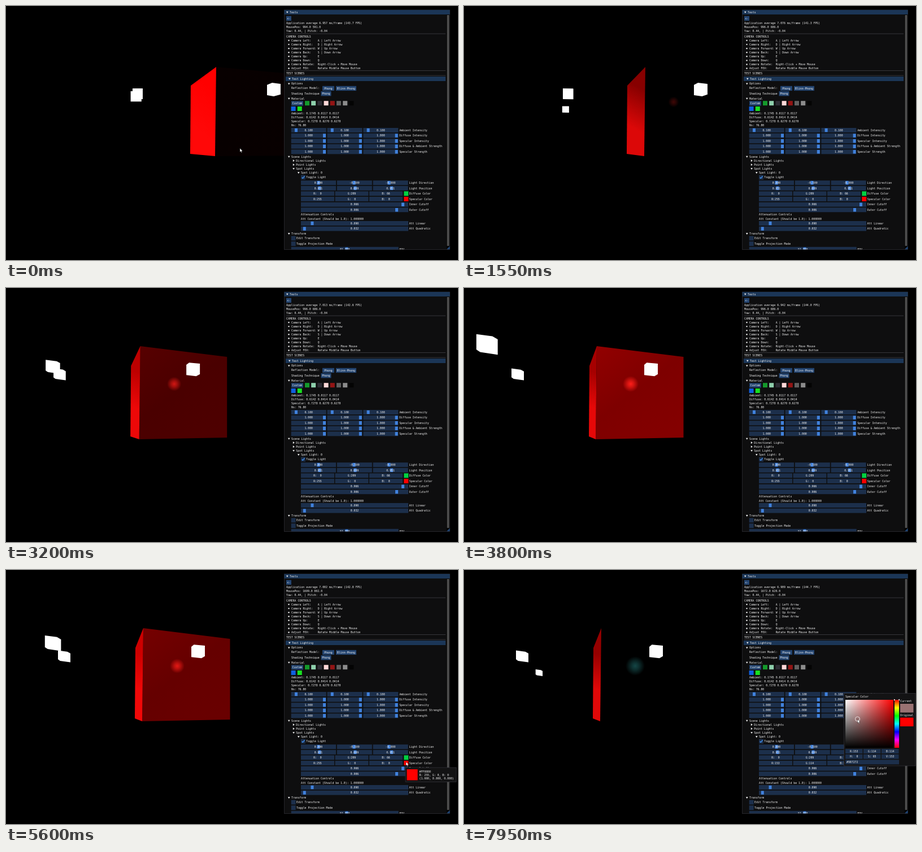
Recreate the animation shown at these times as an HTML page with a canvas. Size 800 by 450 pixels, loop 8000 ms.

```html
<!DOCTYPE html>
<html>
<head>
<meta charset="utf-8">
<style>
html, body { margin: 0; width: 100%; height: 100%; overflow: hidden; background: #000; }
canvas { display: block; width: 800px; height: 450px; }
</style>
</head>
<body>
<canvas id="stage" width="800" height="450"></canvas>
<script>
const ctx = document.getElementById('stage').getContext('2d');
const LOOP = 8;
const FRAME = '#1c2f4b', BUTTON = '#234470', HEADER = '#1b3657', GRAB = '#4182dd', BORDER = '#3a3a42';

// time, post lamp x, near lamp x, side left, side right, swing phase, side red, highlight, ms per frame
const SCENE = [
  [0,    224, 462, 326, 372, -1.61, 255, 0,    6.957],
  [0.85, 212, 450, 317, 361, -0.67, 240, 0.1,  7.03],
  [1.55, 175, 407, 288, 321, 0.1,   220, 0.25, 7.076],
  [2.55, 128, 368, 256, 280, 1.343, 245, 0.55, 7.071],
  [3.35, 74,  308, 212, 228, 2.12,  235, 0.8,  7],
  [3.8,  84,  319, 221, 235, 2.527, 230, 1,    6.942],
  [4.1,  92,  328, 228, 242, 2.79,  230, 1,    6.98],
  [4.8,  92,  328, 228, 243, 3.418, 230, 1,    7.066],
  [6.35, 92,  328, 228, 243, 4.836, 252, 0.65, 6.942],
  [7.95, 92,  328, 228, 243, 6.4,   225, 0.5,  6.909]
];
const MOUSE = [
  [0, 414, 252], [0.6, 415, 292], [4.65, 415, 292], [4.8, 475, 272], [5.6, 708, 340],
  [6.35, 710, 341], [6.85, 710, 341], [7.2, 745, 240], [7.6, 720, 255], [7.95, 696.5, 264.5]
];
const HIDE_MOUSE = 0.6, SHOW_MOUSE = 4.65, HOVER = 5.6, PICK = 6.85, DRAG = 7.2;

const clamp = (v, lo = 0, hi = 1) => Math.min(hi, Math.max(lo, v));
const mix = (a, b, k) => a + (b - a) * k;
const rgb = (...c) => `rgb(${c.map(Math.round).join(',')})`;

function sample(keys, t) {
  let i = 0;
  while (i < keys.length - 2 && t > keys[i + 1][0]) i++;
  const a = keys[i], b = keys[i + 1], k = clamp((t - a[0]) / (b[0] - a[0]));
  return a.slice(1).map((v, n) => mix(v, b[n + 1], k));
}

function rect(x, y, w, h, fill) {
  ctx.fillStyle = fill;
  ctx.fillRect(x, y, w, h);
}

function frame(x, y, w, h, fill) {
  rect(x, y, w, h, fill);
  ctx.strokeStyle = BORDER;
  ctx.lineWidth = 0.6;
  ctx.strokeRect(x, y, w, h);
}

function poly(points, fill) {
  ctx.fillStyle = fill;
  ctx.beginPath();
  for (const [x, y] of points) ctx.lineTo(x, y);
  ctx.closePath();
  ctx.fill();
}

// y is the middle of the capitals; the interface grid is 1920 units wide
function text(s, x, y, align = 'left') {
  ctx.save();
  ctx.translate(x, y + 1.7);
  ctx.scale(1 / 2.4, 1 / 2.4);
  ctx.font = '11.63px "DejaVu Sans Mono", monospace';
  ctx.textAlign = align;
  ctx.fillStyle = '#f4f4f4';
  ctx.fillText(s, 0, 0);
  ctx.restore();
}

function solid(points, x, y, w, h) {
  poly(points.map(([u, v]) => [x + u * w, y + v * h]), '#fff');
}

function drawScene(t, s, sat) {
  const [postX, nearX, left, right, phase, red, shine] = s;
  const forward = clamp(t - 1.55), zoom = 1 + 0.045 * forward;
  const swing = Math.cos(phase);
  const topL = 141 - 3 * forward, topR = 108 - 5 * forward;
  const botR = 266 + 2 * forward, botL = 262 + forward;

  // front face and its highlight
  const spotX = right + 60 - 10 * (1 - forward), spotY = 170;
  const face = [[right, topR], [right + 153.5, 122], [right + 153.5, 265], [right - 2, botR]];
  const lit = clamp(-swing * 1.5);
  if (lit > 0) {
    const g = ctx.createLinearGradient(right, 110, right + 120, 268);
    g.addColorStop(0, rgb(145 * lit, 0, 0));
    g.addColorStop(0.5, rgb(126 * lit, 0, 0));
    g.addColorStop(1, rgb(132 * lit, 0, 0));
    poly(face, g);
  }
  const grey = clamp((1 - sat) / 0.75), radius = mix(8 + 6 * shine, 17, grey);
  const glow = ctx.createRadialGradient(spotX, spotY, 0, spotX, spotY, radius);
  const tone = [mix(255, 40, grey), mix(30, 140, grey), mix(25, 140, grey)].map(Math.round).join(',');
  glow.addColorStop(0, `rgba(${tone},${shine})`);
  glow.addColorStop(0.4, `rgba(${tone},${shine * 0.65})`);
  glow.addColorStop(1, `rgba(${tone},0)`);
  rect(spotX - radius, spotY - radius, 2 * radius, 2 * radius, glow);

  // side face
  const side = ctx.createLinearGradient(right, 150, left, 210);
  side.addColorStop(0, rgb(red * clamp(1 - (255 - red) / 90, 0.6), 0, 0));
  side.addColorStop(1, rgb(red, 8, 8));
  poly([[left + 1, topL], [right, topR], [right - 2, botR], [left, botL]], side);

  // lamps
  const turn = right - left, c = clamp((36 - turn) / 20) * 0.25;
  const facingLeft = [[0, 0], [1 - c, 0.4 * c], [1, c], [1, 1], [0.7 * c, 1 - c / 2], [0, 1 - c]];
  const w = 18 + 16 * c, h = 19 + 8 * c;
  solid(facingLeft, postX, 222 - 76 * zoom, w, h);

  const depth = 0.0158 + 0.0093 * swing + 0.0007 * (1 - forward);
  const worldX = (postX + w / 2 - 400) / (67 * zoom) - 0.33 - 2.13 * swing;
  const size = 0.31 / depth;
  solid(facingLeft, 400 + worldX / depth - size / 2, 222 - 1 / depth - size * 0.48, size, size * 0.96);

  const k = 0.1 + 0.006 * turn;
  solid([[0, 0.16], [k, 0], [1, 0.08], [1, 0.86], [1 - 1.35 * k, 1], [0, 0.92]],
    nearX, 222 - 86 * zoom, 24, 24);
}

function node(label, x, y, open = true) {
  poly(open ? [[x - 6, y - 1.3], [x - 2.4, y - 1.3], [x - 4.2, y + 1.8]]
            : [[x - 5.4, y - 1.9], [x - 2.4, y], [x - 5.4, y + 1.9]], '#f4f4f4');
  text(label, x, y);
}

function button(label, x, y, w) {
  rect(x, y - 4.2, w, 8.3, BUTTON);
  text(label, x + w / 2, y, 'center');
}

function field(value, x, y, w, grab) {
  rect(x, y - 4, w, 8, FRAME);
  if (grab) rect(grab - 2.5, y - 3.2, 5, 6.4, GRAB);
  text(value, x + w / 2, y, 'center');
}

function triple(label, x, y, values, grabs) {
  values.forEach((v, i) => field(v, x + i * 63.8, y, 62, grabs[i]));
  text(label, x + 191.5, y);
}

function wide(label, x, y, value, grab) {
  field(value, x, y, 190, grab);
  text(label, x + 191.5, y);
}

function checkbox(label, x, y, on) {
  rect(x, y - 4, 8, 8, FRAME);
  if (on) {
    ctx.strokeStyle = '#4296fa';
    ctx.lineWidth = 1.2;
    ctx.beginPath();
    ctx.moveTo(x + 1.8, y);
    ctx.lineTo(x + 3.3, y + 1.8);
    ctx.lineTo(x + 6.4, y - 2);
    ctx.stroke();
  }
  text(label, x + 9.3, y);
}

const channels = color => color.map((v, i) => 'RGB'[i] + ':' + String(v).padStart(3));

function colorRow(label, y, color) {
  channels(color).forEach((v, i) => field(v, 522 + i * 60.5, y, 59));
  rect(704.3, y - 4, 8, 8, rgb(...color));
  text(label, 713.8, y);
}

function drawPanel(t, ms, mouse, specular) {
  ctx.save();
  frame(492.5, 7, 293, 424.5, '#0e0e0f');
  ctx.beginPath();
  ctx.rect(492, 6.5, 294, 424.8);
  ctx.clip();
  rect(492.5, 7, 293, 8, HEADER);
  node('Tests', 502, 11);
  rect(779.5, 15, 6, 416, '#060606');
  rect(780.6, 16, 3.8, 409, '#4f4f4f');
  poly([[785.5, 425.5], [785.5, 431], [780, 431]], '#1f4474');

  button('<-', 496, 22, 9);
  text(`Application average ${ms.toFixed(3)} ms/frame (${(1000 / ms).toFixed(1)} FPS)`, 496, 30.5);
  text(`MousePos: ${Math.round(mouse[0] * 2.4)}.0 ${Math.round((mouse[1] - 6) * 2.4)}.0`, 496, 37.5);
  text('Yaw: 0.44, | Pitch: -0.04', 496, 44.5);
  for (const y of [48.8, 114.2, 122.8]) rect(496, y, 282, 0.6, '#505058');
  text('CAMERA CONTROLS', 496, 54);
  [['Left', 'A | Left Arrow'], ['Right', 'D | Right Arrow'], ['Forward', 'W | Up Arrow'],
   ['Back', 'S | Down Arrow'], ['Up', 'E'], ['Down', 'Q'], ['Rotate', 'Right-Click + Move Mouse'],
   ['', 'Rotate Middle Mouse Button']].forEach(([name, keys], i) => {
    const y = 61 + i * 7.08;
    ctx.fillStyle = '#f4f4f4';
    ctx.beginPath();
    ctx.arc(500.5, y, 1.2, 0, 7);
    ctx.fill();
    text(((name ? 'Camera ' + name : 'Adjust FOV') + ':').padEnd(16) + keys, 505, y);
  });
  text('TEST SCENES', 496, 119);

  rect(495, 125, 283, 8, HEADER);
  node('Test Lighting', 506, 129);
  node('Options', 505, 137.7);
  text('Reflection Model:', 505, 145);
  button('Phong', 560, 146, 21);
  button('Blinn-Phong', 584, 146, 36);
  text('Shading Technique', 505, 154.8);
  button('Phong', 557.5, 155.3, 18);
  node('Material', 505, 164);
  button('Custom', 505, 172.5, 21);
  ['#149a2c', '#8fd0ad', '#2c2c34', '#ffd8d8', '#921414', '#606060', '#8c8c8c', '#040404']
    .forEach((c, i) => rect(529 + i * 11.2, 168.2, 8, 8, c));
  rect(504.6, 178, 8, 8, '#0f60e0');
  rect(515.8, 178, 8, 8, '#18e020');
  ['Ambient: 0.1745 0.0117 0.0117', 'Diffuse: 0.6142 0.0414 0.0414',
   'Specular: 0.7278 0.6270 0.6270', 'Ns: 76.80'].forEach((s, i) => text(s, 505, 190.3 + i * 7.08));
  ['Ambient Intensity', 'Diffuse Intensity', 'Specular Intensity', 'Diffuse & Ambient Strength',
   'Specular Strength'].forEach((label, i) => {
    const first = i ? 563.5 : 513.5;
    triple(label, 504.7, 220 + i * 9.58, Array(3).fill(i ? '1.000' : '0.100'),
      [first, first + 63.8, first + 127.6]);
  });

  node('Scene Lights', 505, 267);
  node('Directional Lights', 513.3, 274, false);
  node('Point Lights', 513.3, 281.2, false);
  node('Spot Lights', 513.3, 288.2);
  node('Spot Light: 0', 522, 295.4);
  checkbox('Toggle Light', 522, 303.5, true);
  triple('Light Direction', 522, 313.2, ['0.000', '-0.500', '-0.000'], [553, 616, 678]);
  triple('Light Position', 522, 322.8, ['0.951', '0.699', '0.951'], [555, 618, 682.5]);
  colorRow('Diffuse Color', 332.3, [0, 209, 66]);
  colorRow('Specular Color', 342, specular);
  wide('Inner Cutoff', 522, 351.7, '0.966', 702.5);
  wide('Outer Cutoff', 522, 361.2, '0.906', 691.5);
  text('Attenuation Controls', 522, 369.6);
  text('Att Constant (Should be 1.0): 1.000000', 522, 376.8);
  wide('Att Linear', 522, 385, '0.090', 542);
  wide('Att Quadratic', 522, 394.6, '0.032', 528.3);
  node('Transform', 505, 403.4);
  checkbox('Edit Transform', 504.7, 411.5);
  checkbox('Toggle Projection Mode', 504.7, 421.2);
  wide('FOV', 504.7, 430.8, t < 1 ? '81.000' : '52.000', 603);
  ctx.restore();
}

function drawTooltip([x, y]) {
  ctx.save();
  ctx.translate(x - 710.5, y - 341);
  frame(709.5, 351, 90, 25.5, '#131314');
  rect(712, 354, 19, 19.5, '#f00');
  text('#FF0000', 734, 358.3);
  text('R: 255, G: 0, B: 0', 734, 364.2);
  text('(1.000, 0.000, 0.000)', 734, 369.8);
  ctx.restore();
}

function drawPicker(sat, val, color) {
  const x = 675, y = 230, size = 85;
  frame(672.5, 218.5, 126.5, 128.5, '#131314');
  text('Specular Color', x, 224);
  const across = ctx.createLinearGradient(x, 0, x + size, 0);
  across.addColorStop(0, '#fff');
  across.addColorStop(1, '#f00');
  rect(x, y, size, size, across);
  const down = ctx.createLinearGradient(0, y, 0, y + size);
  down.addColorStop(0, 'rgba(0,0,0,0)');
  down.addColorStop(1, '#000');
  rect(x, y, size, size, down);
  const hue = ctx.createLinearGradient(0, y, 0, y + size);
  for (let i = 0; i <= 6; i++) hue.addColorStop(i / 6, `hsl(${i * 60},100%,50%)`);
  rect(762, y, 8, size, hue);
  poly([[761, 228.5], [763.5, 230], [761, 231.5]], '#fff');
  poly([[771, 228.5], [768.5, 230], [771, 231.5]], '#fff');
  text('Current', 772, 232.5);
  rect(772, 237, 23.5, 15.5, rgb(...color));
  text('Original', 772, 257);
  rect(772, 261.5, 23.5, 15.5, '#f00');
  channels(color).forEach((v, i) => field(v, x + i * 32, 321, 30.5));
  ['H:  0', 'S:' + String(Math.round(sat * 255)).padStart(3), 'V:' + String(Math.round(val * 255)).padStart(3)]
    .forEach((v, i) => field(v, x + i * 32, 330.6, 30.5));
  field('', x, 340.3, 95);
  text('#' + color.map(v => v.toString(16).padStart(2, '0')).join('').toUpperCase(), 677, 340.3);
  ctx.beginPath();
  ctx.arc(x + sat * size, y + (1 - val) * size, 4, 0, 7);
  ctx.fillStyle = rgb(...color);
  ctx.fill();
  ctx.lineWidth = 0.8;
  ctx.strokeStyle = '#fff';
  ctx.stroke();
}

function drawCursor([x, y]) {
  const arrow = [[0, 0], [0, 6.6], [1.5, 5.3], [2.6, 7.8], [3.7, 7.3], [2.7, 4.9], [4.7, 4.8]];
  const points = arrow.map(([u, v]) => [x + u, y + v]);
  poly(points, '#fff');
  ctx.strokeStyle = '#000';
  ctx.lineWidth = 0.4;
  ctx.stroke();
}

function pickedColor(t) {
  if (t < DRAG) return { sat: 1, val: 1, color: [255, 0, 0] };
  const [x, y] = sample(MOUSE, t);
  const sat = clamp((x - 675) / 85), val = clamp(1 - (y - 230.5) / 85);
  const low = Math.round(255 * val * (1 - sat));
  return { sat, val, color: [Math.round(255 * val), low, low] };
}

function draw() {
  const t = performance.now() / 1000 % LOOP;
  const state = sample(SCENE, t), mouse = sample(MOUSE, t);
  const { sat, val, color } = pickedColor(t);
  rect(0, 0, 800, 450, '#000');
  drawScene(t, state, sat);
  drawPanel(t, state[7], mouse, color);
  if (t >= HOVER && t < PICK) drawTooltip(mouse);
  if (t >= PICK) drawPicker(sat, val, color);
  if (t < HIDE_MOUSE || t > SHOW_MOUSE) drawCursor(mouse);
  requestAnimationFrame(draw);
}
draw();
</script>
</body>
</html>
```
